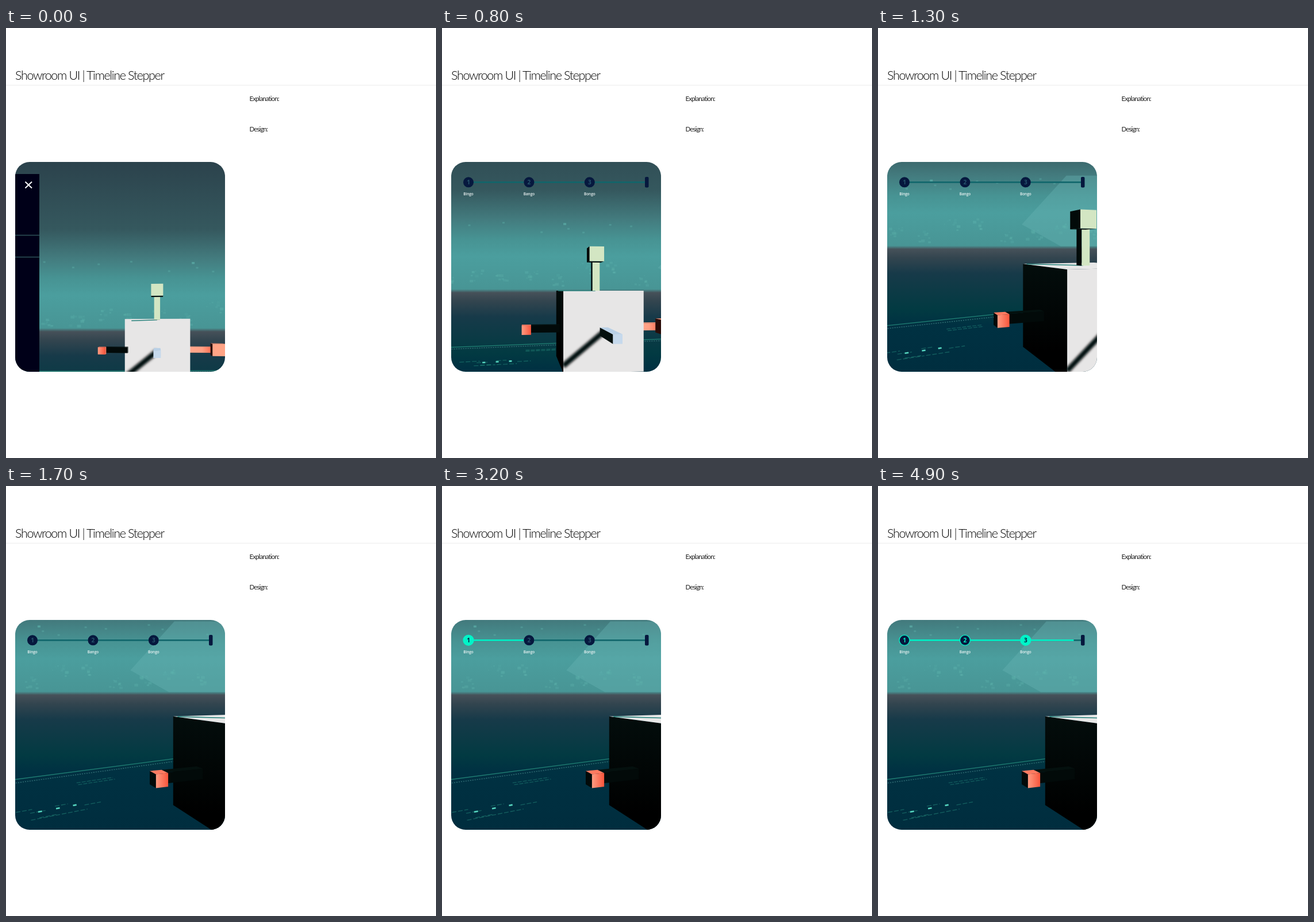
These frames come from a looping animation (748x748 px, 5 s). An HTML page:

```html
<!DOCTYPE html>
<html lang="en">
<head>
<meta charset="utf-8">
<title>Timeline Stepper</title>
<style>
html, body { margin: 0; width: 100%; height: 100%; overflow: hidden; background: #fff; }
svg { display: block; width: 100vw; height: 100vh; }
.page { font-family: Lato, "Open Sans", sans-serif; }
.step { font-family: "Open Sans", "Noto Sans", sans-serif; text-anchor: middle; }
</style>
</head>
<body>
<svg viewBox="0 0 748 748" xmlns="http://www.w3.org/2000/svg">
  <defs>
    <clipPath id="card"><rect x="16" y="233" width="365" height="365" rx="25"/></clipPath>
    <linearGradient id="world" x2="0" y2="1"></linearGradient>
    <linearGradient id="red"><stop stop-color="#ff9c82"/><stop offset="1" stop-color="#f8553c"/></linearGradient>
    <linearGradient id="salmon"><stop stop-color="#ffa88e"/><stop offset=".6" stop-color="#ffa084"/><stop offset="1" stop-color="#ff6c50"/></linearGradient>
    <linearGradient id="shade" x2="0" y2="1"><stop stop-color="#030d0c"/><stop offset=".75" stop-color="#000"/></linearGradient>
    <filter id="soft" filterUnits="userSpaceOnUse" x="0" y="200" width="748" height="600"><feGaussianBlur stdDeviation="2.2"/></filter>
  </defs>
  <g class="page">
    <text x="16" y="89.5" font-size="21.5" font-weight="300" letter-spacing="-1.35">Showroom UI | Timeline Stepper</text>
    <rect y="99" width="748" height="1" fill="#ececec"/>
    <g font-size="11.5" letter-spacing="-.9" fill="#222">
      <text x="423.5" y="127">Explanation:</text>
      <text x="423.5" y="179.5">Design:</text>
    </g>
  </g>
  <g clip-path="url(#card)">
    <g id="scene"></g>
    <g id="panel">
      <rect x="16" y="254" width="42" height="344" fill="#000018"/>
      <path d="M16 360.500H58M16 398.500H58" stroke="#2f5357" stroke-width="1.500"/>
      <path d="M33.500 267.500l11.500 11M45 267.500l-11.500 11" stroke="#fff" stroke-width="2"/>
    </g>
    <g id="stepper"></g>
  </g>
</svg>
<script>
const LOOP = 5000, TICK = 100;
const byId = id => document.getElementById(id);
const scene = byId('scene'), stepper = byId('stepper');
const updates = [];

function set(node, attrs) {
  for (const k in attrs) node.setAttribute(k, attrs[k]);
  return node;
}
function add(parent, tag, attrs, text) {
  const node = set(document.createElementNS('http://www.w3.org/2000/svg', tag), attrs);
  if (text) node.textContent = text;
  return parent.appendChild(node);
}
const clamp = v => Math.max(0, Math.min(1, v));
const smooth = u => u * u * (3 - 2 * u);
const lerp = (a, b, p) => a.map((v, i) => v + (b[i] - v) * p);
const mix = (a, b, p) => `rgb(${lerp(a, b, p).map(Math.round)})`;

let seed = 11;
const rand = (from, to) => {
  seed = seed * 16807 % 2147483647;
  return from + (to - from) * seed / 2147483647;
};

// The camera flies around the model; the body is a cube from -1 to 1.
const FOCAL = 540, CENTER = [198.5, 415.5];
const EYE = [[0, .66, 10.64], [-4.635, 1.52, 5.1]];
const AIM = [[-1.26, 2.82, .07], [-.315, .3, -6.1]];
const FLIGHT = [160, 1660];
let camera;

function moveCamera(t) {
  const p = smooth(clamp((t - FLIGHT[0]) / (FLIGHT[1] - FLIGHT[0])));
  const eye = lerp(...EYE, p), aim = lerp(...AIM, p);
  const dx = aim[0] - eye[0], dz = aim[2] - eye[2];
  const slope = (aim[1] - eye[1]) / Math.hypot(dx, dz);
  camera = { eye, yaw: Math.atan2(dx, -dz), horizon: CENTER[1] + FOCAL * slope };
}
function project(point) {
  const { eye, yaw, horizon } = camera;
  const [x, y, z] = point.map((v, i) => v - eye[i]);
  const scale = FOCAL / (x * Math.sin(yaw) - z * Math.cos(yaw));
  return [CENTER[0] + (x * Math.cos(yaw) + z * Math.sin(yaw)) * scale, horizon - y * scale];
}
// A direction at infinity: azimuth in degrees, height in pixels above the horizon
const projectSky = (azimuth, height) =>
  [CENTER[0] + FOCAL * Math.tan(azimuth * Math.PI / 180 - camera.yaw), camera.horizon - height];

function segment(a, b, attrs) {
  const node = add(scene, 'line', attrs);
  updates.push(() => {
    const [x1, y1] = project(a), [x2, y2] = project(b);
    set(node, { x1, y1, x2, y2 });
  });
}

const DARK = '#020a09';
// Faces turned away from the eye are left empty; the left and lower sides lie in the dark.
function box(center, half, front, light = front, left = DARK) {
  for (let axis = 0; axis < 3; axis++) {
    for (const side of [-1, 1]) {
      const fill = axis === 2 ? front : side > 0 ? light : axis ? DARK : left;
      const face = add(scene, 'polygon', { fill });
      const corners = [[-1, -1], [1, -1], [1, 1], [-1, 1]].map(([u, v]) => {
        const sign = [];
        sign[axis] = side;
        sign[(axis + 1) % 3] = u;
        sign[(axis + 2) % 3] = v;
        return center.map((c, i) => c + half[i] * sign[i]);
      });
      updates.push(() => {
        const seen = (camera.eye[axis] - center[axis]) * side > half[axis];
        set(face, { points: seen ? corners.map(project).join(' ') : '' });
      });
    }
  }
}

function buildSky() {
  const top = -300, height = 600;
  const stops = [[-300, '#2b414b'], [-175, '#35585e'], [-125, '#437b7e'], [-90, '#479393'],
    [-60, '#4b9e9e'], [-3, '#489595'], [3, '#465159'], [18, '#33454f'], [45, '#173a49'],
    [108, '#023a42'], [135, '#003142'], [240, '#002d3e']];
  for (const [y, color] of stops)
    add(byId('world'), 'stop', { offset: (y - top) / height, 'stop-color': color });
  const backdrop = add(scene, 'rect', { width: 400, height, fill: 'url(#world)' });
  updates.push(() => set(backdrop, { y: camera.horizon + top }));

  const glow = add(scene, 'polygon', { fill: '#66b4b4', opacity: .38 });
  const glowShape = [[23, 40], [31, 125], [60, 125], [60, 2], [30, 2]];
  updates.push(() => set(glow, { points: glowShape.map(c => projectSky(...c)).join(' ') }));
}

function cityLight(azimuth, height, size, opacity) {
  const node = add(scene, 'rect', { width: size, height: size * .7, fill: '#62b8b0', opacity });
  updates.push(() => {
    const [x, y] = projectSky(azimuth, height);
    set(node, { x, y });
  });
}
function buildCity() {
  for (let azimuth = -20; azimuth < 40; azimuth += 5) {
    const height = rand(18, 42);
    for (let i = 0; i < 9; i++)
      cityLight(azimuth + rand(-1.3, 1.3), height + rand(-10, 10), rand(2, 7), rand(.1, .35));
    cityLight(azimuth + rand(-2, 2), rand(95, 122), 4, .35);
  }
  cityLight(6.2, 118, 5, .6);
}

function buildGround() {
  // Everything on the ground runs along one slightly turned direction.
  const streak = (x, z, length, attrs) =>
    segment([x, -1.8, z - .143 * x], [x + length, -1.8, z - .143 * (x + length)],
      { stroke: '#2d9b87', 'stroke-width': 1.3, ...attrs });
  streak(-9, -8.1, 18, { opacity: .75 });
  streak(-9, -7.6, 18, { stroke: '#5a9c9d', 'stroke-dasharray': '2 2', opacity: .6 });
  for (let i = 0; i < 2; i++)
    streak(-2, -6.5 + i * .25, 1.5, { 'stroke-dasharray': '7 2', opacity: .4 });
  for (let i = 0; i < 7; i++)
    streak(rand(-4.6, -2), rand(-4.7, -3.6), rand(.3, .8), { 'stroke-dasharray': '8 3', opacity: .45 });
  for (let i = 0; i < 3; i++)
    streak(-3.65 + i * .51, -4.35, .11, { stroke: '#56d6c0', 'stroke-width': 2.6 });
}

function buildModel() {
  const green = '#d3e6c3', peach = '#ffa486', rod = '#04100e';
  box([1.4, 0, 0], [.4, .1, .1], 'url(#salmon)', '#ff9a7c');
  box([2, 0, 0], [.2, .2, .2], peach, '#ff9274', '#2a0c08');
  box([0, 0, 0], [1, 1, 1], '#e7e6e6', '#e8e8e8', 'url(#shade)');
  segment([0, 1, 0], [-.95, 1, -.9], { stroke: '#27817b', 'stroke-width': 1.6 });
  segment([0, 0, 1], [-1, -.82, 1], { stroke: '#050808', 'stroke-width': 9, filter: 'url(#soft)' });
  box([0, 1.4, 0], [.1, .4, .1], green);
  box([0, 2, 0], [.2, .2, .2], green);
  box([-1.39, -.03, 0], [.39, .1, .1], DARK, rod);
  box([-1.9, -.06, 0], [.125, .125, .125], 'url(#red)', '#ff7a60');
  box([0, 0, 1.6], [.1, .1, .6], '#c6d9ec', '#b9d0e6', rod);
}

const NAVY = [6, 24, 62], MINT = [0, 244, 200], DIM = [38, 84, 108];
const STEP_START = 2300, STEP_TIME = 1000, FILL_TIME = 900, FADE = 200;

function buildStepper() {
  const y = 268.3, gap = 105.4, length = 87.5;
  ['Bingo', 'Bango', 'Bongo'].forEach((label, i) => {
    const x = 46 + i * gap, start = STEP_START + i * STEP_TIME;
    const bar = { x: x + 9, y: y - 1.3, height: 2.6 };
    const text = (dy, size, weight, fill, content) => add(stepper, 'text',
      { class: 'step', x, y: y + dy, 'font-size': size, 'font-weight': weight, fill }, content);
    add(stepper, 'rect', { ...bar, width: length, fill: '#10666b' });
    const fill = add(stepper, 'rect', { ...bar, fill: `rgb(${MINT})` });
    const dot = add(stepper, 'circle', { cx: x, cy: y, r: 9, stroke: `rgb(${MINT})`, 'stroke-width': 1.3 });
    const number = text(3.5, 10, 700, '', String(i + 1));
    text(22.2, 6.4, 600, '#f0f6f6', label);
    updates.push(t => {
      const active = clamp((t - start) / FADE), done = clamp((t - start - STEP_TIME) / FADE);
      const progress = 1 - (1 - clamp((t - start) / FILL_TIME)) ** 1.75;
      set(fill, { width: length * progress });
      set(dot, { fill: mix(NAVY, MINT, active * (1 - done)), 'stroke-opacity': active });
      set(number, { fill: done ? mix(NAVY, MINT, done) : mix(DIM, NAVY, active) });
    });
  });
  add(stepper, 'rect', { x: 353, y: y - 9.2, width: 6.5, height: 18.5, rx: 2, fill: `rgb(${NAVY})` });
  updates.push(t => {
    const shown = 1 - (1 - clamp((t - 100) / 600)) ** 3;
    set(stepper, { opacity: shown, transform: `translate(0 ${-44 * (1 - shown)})` });
    set(byId('panel'), { transform: `translate(${-45 * clamp(t / 200)} 0)` });
  });
}

buildSky();
buildCity();
buildGround();
buildModel();
buildStepper();

function render(t) {
  moveCamera(t);
  for (const update of updates) update(t);
}
const began = performance.now();
function frame() {
  const t = (performance.now() - began) % LOOP;
  render(Math.floor(t / TICK) * TICK);
  requestAnimationFrame(frame);
}
render(0);
requestAnimationFrame(frame);
</script>
</body>
</html>
```
